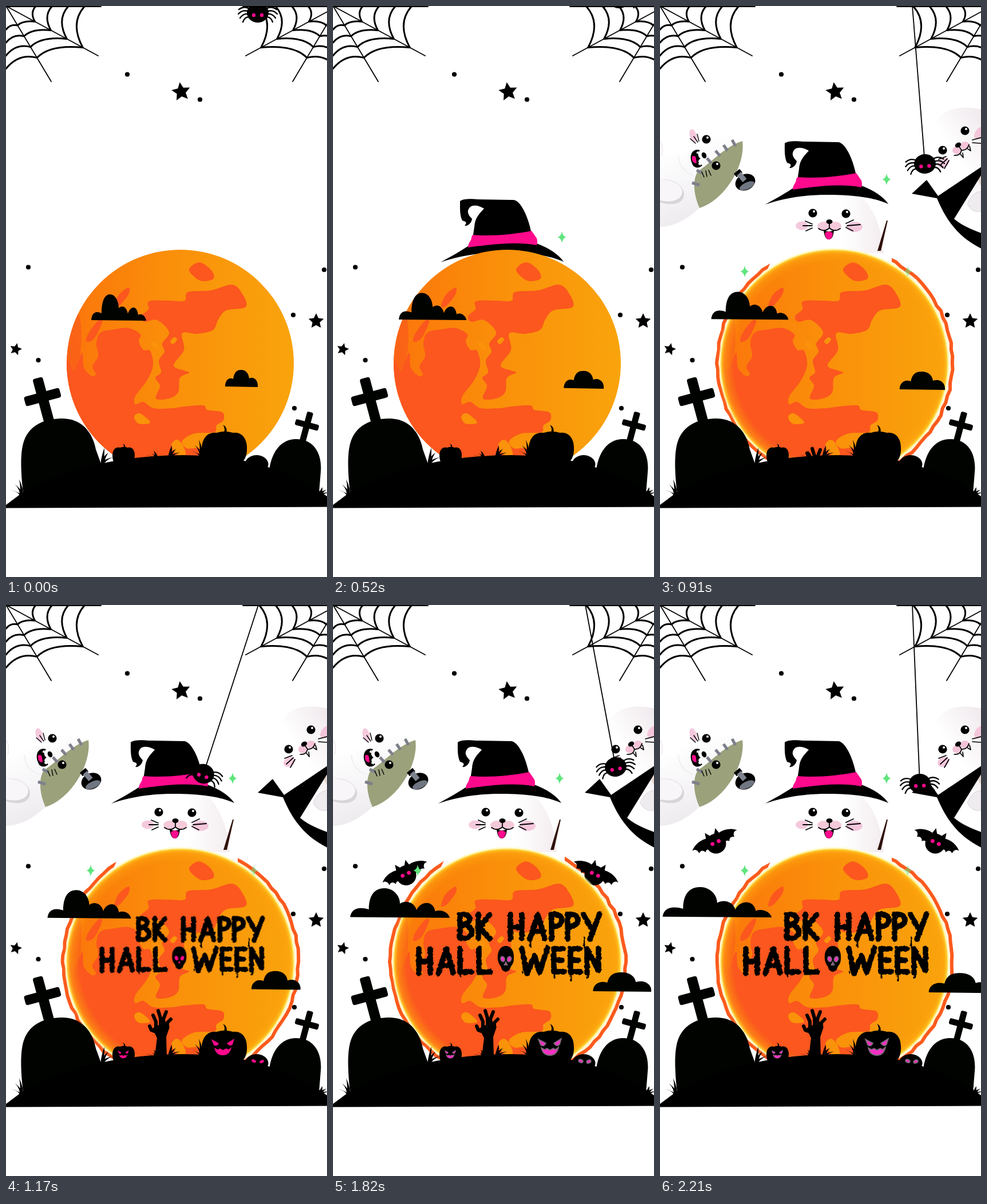
An HTML page that plays this animation: 561 by 998 pixels, repeating every 2.34 s.

```html
<!DOCTYPE html>
<html lang="en">
<head>
<meta charset="utf-8">
<title>Happy Halloween</title>
<style>
html, body { margin: 0; width: 100%; height: 100%; overflow: hidden; background: #fff; }
svg { display: block; width: 100vw; height: 100vh; }
.line { fill: none; stroke: #000; stroke-linecap: round; stroke-linejoin: round; }
.pink { fill: var(--glow, #ff0a8c); }
.blush { fill: #f2b7d2; opacity: .75; }
.lit { --glow: #f52fc4; stroke: #776b76; stroke-width: 1.8; }
</style>
</head>
<body>
<svg viewBox="0 0 561 998">
<defs>
  <linearGradient id="moonFill"><stop offset="0" stop-color="#fb750b"/><stop offset=".45" stop-color="#fa8f0a"/><stop offset="1" stop-color="#f9a40c"/></linearGradient>
  <radialGradient id="rim"><stop offset=".88" stop-color="#fa9a08" stop-opacity="0"/><stop offset=".96" stop-color="#ffa810" stop-opacity=".5"/><stop offset="1" stop-color="#ffd62c"/></radialGradient>
  <linearGradient id="furR"><stop offset=".6" stop-color="#fff"/><stop offset="1" stop-color="#f3ecef"/></linearGradient>
  <linearGradient id="furL" x1=".3" y1="0" x2=".6" y2="1"><stop offset=".2" stop-color="#fff"/><stop offset="1" stop-color="#ebe7ec"/></linearGradient>
  <linearGradient id="furTop" x1=".2" y1=".9" x2=".8" y2="0"><stop offset=".5" stop-color="#fff"/><stop offset="1" stop-color="#f0e9ed"/></linearGradient>
  <clipPath id="disc"><circle cx="304.5" cy="624.5" r="198.5"/></clipPath>
  <filter id="soft"><feGaussianBlur stdDeviation="1"/></filter>
  <filter id="brush" color-interpolation-filters="sRGB"><feTurbulence type="fractalNoise" baseFrequency=".2" numOctaves="2" seed="4"/><feDisplacementMap in="SourceGraphic" scale="4" xChannelSelector="R" yChannelSelector="G"/></filter>
  <path id="spark" fill="#5fe57d" d="M0,-10 Q1.5,-1.5 7.5,0 Q1.5,1.5 0,10 Q-1.5,1.5 -7.5,0 Q-1.5,-1.5 0,-10Z"/>
  <g id="eye"><circle r="7.6"/><circle cx="2" cy="-3" r="2" fill="#fff"/></g>
  <g id="face" class="pink">
    <path d="M-20,-13 L-7,-6 Q-10,1 -16,-3Z M20,-14 L7,-6 Q12,1 17,-4Z"/>
    <path d="M-15,2 L-9,5 L-5,3 L0,6 L6,3 L10,5 L15,1 Q12,15 0,15 Q-12,15 -15,2Z"/>
  </g>
  <g id="wing"><path d="M8,-14 C20,-18 34,-15 43,-6 C37,-7 34,-3 34,3 C29,-1 25,1 23,6 C19,1 16,3 13,8Z M3,-15 L10,-25 L14,-9Z"/><circle class="pink" cx="6" cy="-2" r="3.4"/></g>
  <g id="bat"><circle r="17.5"/><use href="#wing"/><use href="#wing" transform="scale(-1 1)"/></g>
  <path id="legs" class="line" stroke-width="2.3" d="M14,-7 Q24,-13 33,-6 M15,-2 Q26,-7 34,2 M15,3 Q24,-1 31,9 M13,8 Q22,5 26,16"/>
  <g id="web" class="line"></g>
</defs>

<g id="sealL">
  <path d="M0,236 C20,205 70,200 100,222 L140,240 L70,352 Q34,386 0,386Z" fill="url(#furL)"/>
  <path d="M0,236 Q7,246 3,262 M32,262 Q34,288 58,296" fill="none" stroke="#f1edf1" stroke-width="2"/>
  <path d="M0,304 C20,300 40,312 42,328 C42,346 22,350 0,343Z" fill="#d9d4da"/>
  <path d="M0,304 C20,302 38,312 39,324 C38,340 20,344 0,340Z" fill="#f8f6f8"/>
  <path d="M144,236 C150,280 112,340 69,353 C58,328 57,304 66,289 C90,274 112,246 144,236Z" fill="#9aa17b"/>
  <path d="M126,234 l6,11 M111,243 l7,10 M97,253 l8,9 M82,266 l8,9 M64,287 l10,5 M56,309 l13,4" stroke="#7d808b" stroke-width="5"/>
  <g transform="rotate(-25 149 308)"><ellipse cx="149" cy="308" rx="18" ry="14"/><ellipse cx="149" cy="315" rx="14" ry="6" fill="#6f7681"/></g>
  <path d="M134,289 L139,295" stroke="#000" stroke-width="13"/>
  <path d="M138,293 L148,305" stroke="#7d838e" stroke-width="9"/>
  <ellipse class="blush" cx="58" cy="227" rx="6" ry="12" transform="rotate(-15 58 227)"/>
  <use href="#eye" x="81" y="233"/><use href="#eye" x="98" y="279"/>
  <ellipse cx="77" cy="261" rx="4" ry="5.5" transform="rotate(-25 77 261)"/>
  <path d="M70,252 C56,248 50,262 56,275 C59,285 70,284 74,278 C65,276 66,268 71,267 C65,262 66,257 70,252Z"/>
  <path class="pink" d="M56,263 q6,-3 7,4 l1,8 q-9,0 -8,-12"/>
  <path d="M63,257 l4,-4 1,6z M66,276 l5,-3 0,6z" fill="#fff"/>
  <path class="line" stroke-width="1.4" d="M53,232 L62,240 M59,228 L66,238 M65,224 L68,236 M73,290 L77,299 M80,288 L82,298 M85,287 L89,296"/>
</g>

<g id="sealR">
  <path d="M484,200 C500,174 540,172 580,186 V400 L514,330 C478,300 470,240 484,200Z" fill="url(#furTop)"/>
  <ellipse class="blush" cx="558" cy="222" rx="7" ry="12" transform="rotate(35 558 222)"/>
  <ellipse class="blush" cx="495" cy="274" rx="11" ry="8" transform="rotate(-35 495 274)"/>
  <ellipse cx="519" cy="252" rx="8" ry="7" fill="#f4c3d8"/><ellipse cx="533" cy="244" rx="8" ry="7" fill="#f4c3d8"/>
  <use href="#eye" x="533" y="218"/><use href="#eye" x="494" y="252"/>
  <ellipse cx="521" cy="243" rx="5.5" ry="4" transform="rotate(-30 521 243)"/>
  <path class="line" stroke-width="1.7" d="M523,246 L527,252 M514,261 Q525,262 527,252 Q537,253 540,242 M525,259 L530,265 L529,257 M538,250 L543,253 L541,245 M487,268 L500,263 M490,278 L502,267 M497,284 L505,270 M546,234 L561,230 M546,239 L561,240"/>
  <path d="M505,350 L561,290 H590 V420 L561,400Z" fill="url(#furTop)"/>
  <path d="M552,300 L561,290 V314Z" fill="#e6d6cf"/>
  <path d="M561,324 C548,326 542,334 537,346 Q545,362 561,359Z" fill="#efecf0" stroke="#d9d3da"/>
  <path d="M440,328 L466,304 L486,332 L590,262 L561,296 L514,372 Q534,390 590,406 V436 C540,418 508,394 484,336Z"/>
</g>

<g id="ring"><circle cx="305" cy="624" r="204" fill="#fffbe6"/><path id="flame" fill="none" stroke="#fb5a1d" stroke-width="6"/></g>
<g id="bats"><use id="batL" href="#bat"/><use id="batR" href="#bat"/></g>

<g id="witch">
  <path d="M187,462 L196,442 Q225,424 293,424 Q370,424 405,434 V500 H187Z" fill="#fff"/>
  <path d="M212,432 C220,380 225,345 245,326 L345,328 C375,350 389,395 391,432Z" fill="url(#furR)"/>
  <path d="M398,375 L386,428 L380,428 L396,375Z" fill="#30110c"/>
  <ellipse class="blush" cx="248" cy="384" rx="11" ry="7.5"/><ellipse class="blush" cx="340" cy="386" rx="14" ry="9"/>
  <ellipse cx="286" cy="385" rx="11" ry="8" fill="#f4c9da"/><ellipse cx="306" cy="385" rx="11" ry="8" fill="#f4c9da"/>
  <use href="#eye" x="267" y="362"/><use href="#eye" x="325" y="363"/>
  <path d="M286,392 Q295,396 304,392 C303,403 300,408 295,408 C290,408 287,402 286,392Z"/>
  <path class="pink" d="M288,397 Q295,391 302,397 C301,404 299,408 295,408 C291,408 289,404 288,397Z"/>
  <ellipse cx="296" cy="377" rx="5.5" ry="4"/>
  <path class="line" stroke-width="1.8" d="M296,380 V388 M277,389 Q287,396 296,388 Q305,396 315,389 M254,376 L266,381 M250,384 L266,384 M255,393 L266,388 M325,380 L338,374 M327,384 L350,382 M325,387 L337,393"/>
  <path d="M238,318 L243,285 C244,268 253,261 260,253 C250,247 240,246 235,251 C229,258 232,264 239,271 C238,279 231,284 226,283 C231,277 228,276 222,274 C217,264 218,250 218,240 C224,235 240,236 250,237 L312,238 C325,240 341,272 346,316Z"/>
  <path d="M184,347 C200,338 218,328 233,318 L352,314 C374,322 391,334 399,346 C375,335 340,330 293,330 C250,330 215,336 184,347Z"/>
  <path class="pink" d="M240,299 C275,302 312,298 343,292 L352,305 Q354,311 352,317 C315,310 275,315 232,321 C232,312 238,310 238,303Z"/>
  <use href="#spark" x="396" y="303"/>
</g>

<g clip-path="url(#disc)">
  <circle cx="304.5" cy="624.5" r="199" fill="url(#moonFill)"/>
  <g id="marks" fill="#fb571e"></g>
</g>
<g id="halo"><circle cx="304.5" cy="624.5" r="199" fill="url(#rim)"/><circle cx="304.5" cy="624.5" r="199.5" fill="none" stroke="#fff7b0" stroke-width="2.5" filter="url(#soft)"/></g>
<use id="sparkL" href="#spark" x="148" y="464"/><use id="sparkR" href="#spark" x="433" y="464"/>

<g id="title" role="img" aria-label="BK Happy Halloween">
  <g id="letters" class="line" filter="url(#brush)"></g>
  <path d="M302,596 C292,596 287,606 288,619 C289,629 294,630 295,637 Q302,645 309,637 C310,630 316,629 316,618 C317,606 312,596 302,596Z"/>
  <g id="skull" class="pink"><ellipse cx="296.5" cy="619" rx="3.4" ry="4.6" transform="rotate(-20 296 619)"/><ellipse cx="308" cy="619" rx="3.4" ry="4.6" transform="rotate(20 308 619)"/><path d="M302,624 l2.5,5 h-5z"/></g>
</g>

<path id="cloudL" fill="#000300" d="M0,45 C1,32 8,28 18,33 C18,10 24,0 33,0 C42,0 48,12 48,24 C54,18 62,22 64,34 C68,20 80,18 82,36 C88,32 95,38 96,46Z"/>
<path id="cloudR" fill="#000300" d="M0,29 C0,18 7,12 14,16 C16,4 20,0 28,0 C36,0 41,6 42,15 C50,11 58,18 57,30Z"/>

<g id="hand">
  <path d="M256,740 Q270,728 286,737 L280,755 L281,789 H260 L264,757Z"/>
  <path class="line" stroke-width="6" d="M262,746 L254,743 L251,736 M262,740 L262,728 L257,717 M270,737 L270,722 L266,709 M277,737 L275,724 L280,711 M282,740 L282,730 L288,724"/>
</g>

<g fill="#000300">
  <path d="M30,852 C24,800 26,772 33,756 C45,730 70,721 100,721 C135,722 152,748 157,775 L166,800 V852Z"/>
  <path d="M460,852 V812 C464,780 480,757 507,757 C540,757 553,785 550,815 L547,852Z"/>
  <g transform="rotate(-15 64 684)"><rect x="55" y="649" width="18" height="84" rx="4"/><rect x="32" y="675" width="64" height="17" rx="4"/></g>
  <g transform="rotate(15 526 732)"><rect x="520.5" y="709" width="11" height="60" rx="3"/><rect x="505" y="727" width="42" height="10.5" rx="3"/></g>
</g>
<path d="M0,877.5 V872 L28,851 Q100,812 165,800 Q235,785 310,785 Q400,786 458,806 Q520,826 561,857 V875.5Z"/>
<path d="M342,775 C342,754 354,744 368,746 Q382,741 397,746 C412,744 421,756 421,772 C422,795 410,806 382,806 C354,806 342,795 342,775Z M379,748 C384,742 382,736 379,732 Q388,736 385,748Z"/>
<path d="M186,786 C186,774 193,770 199,772 Q206,769 213,772 C220,770 225,776 225,785 C225,800 217,806 206,806 C194,806 186,800 186,786Z M204,773 Q208,769 204,765 Q210,767 208,773Z"/>
<ellipse cx="438" cy="801" rx="20.5" ry="16"/>
<g id="faces">
  <use href="#face" x="379" y="772"/><use href="#face" transform="translate(205 785) scale(.48)"/>
  <g class="pink"><ellipse cx="433" cy="797" rx="4" ry="2.6" transform="rotate(25 433 797)"/><ellipse cx="447" cy="798" rx="4" ry="2.6" transform="rotate(-25 447 798)"/></g>
</g>
<g id="scenery"></g>
<g id="spider">
  <use href="#legs"/><use href="#legs" transform="scale(-1 1)"/>
  <ellipse rx="19" ry="17"/>
  <g class="pink"><circle cx="-7" cy="4" r="3.2"/><circle cx="7" cy="4" r="3.2"/></g>
</g>
<path id="thread" class="line" stroke-width="1.8"/>
</svg>
<script>
const STEP = 130, COUNT = 18;
const $ = id => document.getElementById(id);
const set = (id, name, value) => $(id).setAttribute(name, value);
const move = (id, x, y, rest = '') => set(id, 'transform', `translate(${x} ${y}) ${rest}`);
const fade = (id, value) => set(id, 'opacity', value);
const points = text => text.split(' ').map(p => p.split(',').map(Number));
const polar = (cx, cy, r, a) => [cx + r * Math.cos(a), cy + r * Math.sin(a)];

function seeded(seed) {
  let s = seed * 7919 + 17;
  return () => (s = (s * 16807) % 2147483647) / 2147483647;
}

// Corner web: sagging threads between three rays
const sag = ([a, b], [c, d]) => `M${a},${b} Q${(a + c) * .41},${(b + d) * .41} ${c},${d}`;
function web() {
  let threads = '';
  for (let i = 0; i < 4; i++) {
    const x = 137 - 28.5 * i, a = [x * .98, x * .53], b = [x * .395, x * .66];
    threads += sag([x, 1], a) + sag(a, b) + sag(b, [0, x * .8]);
  }
  return `<path stroke-width="1.8" d="M0,1 H166 M0,0 L161,87 M0,0 L79,132"/><path stroke-width="3" d="${threads}"/>`;
}
$('web').innerHTML = web();

function star(x, y, r, turn) {
  const pts = Array.from({ length: 10 }, (_, i) => polar(x, y, i % 2 ? r * .48 : r, (i * 36 + turn - 90) * Math.PI / 180));
  return `<polygon points="${pts.join(' ')}"/>`;
}
// Three blades that fan out to one side
function tuft(x, y, dir, h) {
  let d = '';
  for (let i = 0; i < 3; i++) {
    const tx = x + dir * (4 + 7 * i), ty = y - h * (1 - .28 * i), my = (y + ty) / 2;
    d += `M${x - 3},${y} Q${x - 1},${my - 2} ${tx},${ty} Q${x + 4},${my} ${x + 3},${y}Z`;
  }
  return `<path d="${d}"/>`;
}
$('scenery').innerHTML =
  '<use href="#web"/><use href="#web" transform="translate(580 0) scale(-1 1)"/>' +
  star(306, 150, 17, -8) + star(542, 551, 14, 0) + star(17, 600, 11, 14) +
  points('212,119.5 339,163.5 39,456.5 556,461 502,540 56.5,619 504,703').map(([x, y]) => `<circle cx="${x}" cy="${y}" r="4.1"/>`).join('') +
  tuft(168, 802, 1, 30) + tuft(262, 791, -1, 14) + tuft(286, 790, 1, 22) +
  tuft(341, 792, -1, 34) + tuft(27, 860, -1, 33) + tuft(549, 856, 1, 15);

// Closed smooth outline through a few points
function blob(text, attrs = '') {
  const p = points(text), n = p.length, get = i => p[(i + n) % n];
  const ctrl = (i, sign) => get(i).map((v, j) => v + sign * (get(i + 1)[j] - get(i - 1)[j]) / 6);
  const d = p.map((_, i) => `C${ctrl(i, 1)} ${ctrl(i + 1, -1)} ${get(i + 1)}`).join('');
  return `<path d="M${p[0]}${d}Z" ${attrs}/>`;
}
const light = 'fill="#fa920a"';
$('marks').innerHTML =
  blob('320,460 338,448 358,461 363,476 345,481 331,475') +
  blob('214,492 197,505 189,525 198,524 214,504') +
  blob('250,516 285,515 312,515 318,500 358,497 395,487 413,503 419,526 385,532 371,548 362,566 335,573 308,572 311,601 293,628 311,637 320,641 304,650 301,675 285,686 262,686 269,664 261,650 271,640 267,620 277,604 273,590 285,570 264,549 242,552 236,542 249,530') +
  blob('121,540 104,625 120,637 130,605 131,556', 'opacity=".6"') +
  blob('160,551 143,574 141,587 155,580 168,552') +
  blob('104,632 119,637 133,606 136,632 150,647 157,643 151,630 161,612 158,590 165,571 190,565 215,563 235,574 232,586 240,601 252,603 257,628 246,655 226,682 226,696 240,692 258,703 290,703 312,700 345,698 352,706 378,710 380,724 368,733 364,745 330,747 308,760 316,773 345,778 345,840 100,840') +
  blob('224,718 234,712 252,728 232,730', light) +
  blob('289,768 298,758 308,766 314,784 300,785', light) +
  blob('254,588 262,588 268,600 258,597', light) +
  blob('287,586 294,579 299,583 292,591', light);

// Brush lettering: strokes per letter and the advance to the next one
const glyphs = {
  B: [32, 'M0,0V42M-1,0C22,-3 22,16 3,18C28,19 26,44 0,42'],
  K: [36, 'M0,0V42M20,0L2,23L20,42'],
  H: [34, 'M0,0V43M20,0V42M0,22H20'],
  A: [38, 'M0,43L14,0L26,42M4,29H24'],
  P: [28, 'M0,43V0C24,-4 24,22 1,21'],
  Y: [30, 'M0,0L12,22M28,-1L11,43'],
  L: [33, 'M0,0V41L20,40'],
  O: [42, ''],
  W: [56, 'M0,0L9,43L22,12L31,41L45,-2'],
  E: [29, 'M16,0H0V40H18M0,20H14'],
  N: [30, 'M0,42V0L20,38V-1'],
  ' ': [20, '']
};
function lettering(text, x, y) {
  const rnd = seeded(text.length);
  return [...text].map(c => {
    const [step, d] = glyphs[c], drip = 42 + Math.max(0, rnd() * 26 - 10);
    const out = d && `<g transform="translate(${x} ${y})"><path stroke-width="9.5" d="${d}"/><path stroke-width="3" d="M1,40V${drip}"/></g>`;
    x += step;
    return out;
  }).join('');
}
$('letters').innerHTML = lettering('BK HAPPY', 222, 541) + lettering('HALLOWEEN', 150, 601);

// Progress from step a to step b
const part = (k, a, b) => Math.min(1, Math.max(0, (k - a) / (b - a)));
const inOut = (k, a, b) => .5 - .5 * Math.cos(Math.PI * part(k, a, b));
const out = (k, a, b) => 1 - (1 - part(k, a, b)) ** 2;

// Turning points of the spider: step, x, y
const swing = [[0, 440, 12], [4, 500, -13], [7, 463, 276], [9, 345, 295], [12, 359, 301], [14, 494, 283], [17, 454, 312]];
function spiderAt(k) {
  const n = Math.max(1, swing.findIndex(s => s[0] >= k));
  const [a, b] = [swing[n - 1], swing[n]], f = part(k, a[0], b[0]);
  return [1, 2].map(i => a[i] + (b[i] - a[i]) * f);
}

function flame(seed) {
  const rnd = seeded(seed);
  const pts = Array.from({ length: 110 }, (_, i) => polar(305.5, 624, 204 + rnd() * 3, i / 110 * Math.PI * 2));
  return `M${pts.map(p => p.map(v => v.toFixed(1))).join('L')}Z`;
}

function draw(k) {
  move('cloudL', 149 - 8.5 * k, 504 - .65 * k, `scale(${1 + .058 * k} ${1 + .009 * k})`);
  move('cloudR', 383 + 5.1 * k, 636 + .42 * k, `scale(${1 + .056 * k} ${1 + .01 * k})`);

  const rise = 260 * (1 - inOut(k, 0, 7)), side = 190 * (1 - inOut(k, 4, 7));
  move('witch', rise * .04, rise);
  move('sealL', -side, 0);
  move('sealR', side, 0);

  const glow = out(k, 5, 7);
  for (const id of ['ring', 'halo', 'sparkL']) fade(id, glow);
  fade('sparkR', glow * (.5 + .5 * Math.cos((k - 12) * Math.PI / 2)));
  set('flame', 'd', flame(k));

  const left = COUNT - 1 - k;
  fade('bats', k < 13 ? 0 : 1);
  move('batL', 98 + 10 * left, 417 + 18.5 * left, 'rotate(-25)');
  move('batR', 481 - 8 * left, 417 + 18.5 * left, 'rotate(25)');

  move('title', 309, 603, `scale(${out(k, 7, 10)}) translate(-309 -603)`);
  move('hand', 0, 86 * (1 - inOut(k, 6, 9)));
  fade('faces', part(k, 7, 9));
  for (const id of ['faces', 'skull']) $(id).classList.toggle('lit', k > 12);

  const [x, y] = spiderAt(k), turn = k > 4 ? Math.atan2(441 - x, y) : 0;
  move('spider', x, y, `rotate(${turn * 180 / Math.PI})`);
  set('thread', 'd', k > 4 ? `M441,0 L${x + 16 * Math.sin(turn)},${y - 16 * Math.cos(turn)}` : '');
}

const start = performance.now();
let last = -1;
function tick() {
  const k = Math.floor((performance.now() - start) / STEP) % COUNT;
  if (k !== last) draw(last = k);
  requestAnimationFrame(tick);
}
tick();
</script>
</body>
</html>
```
